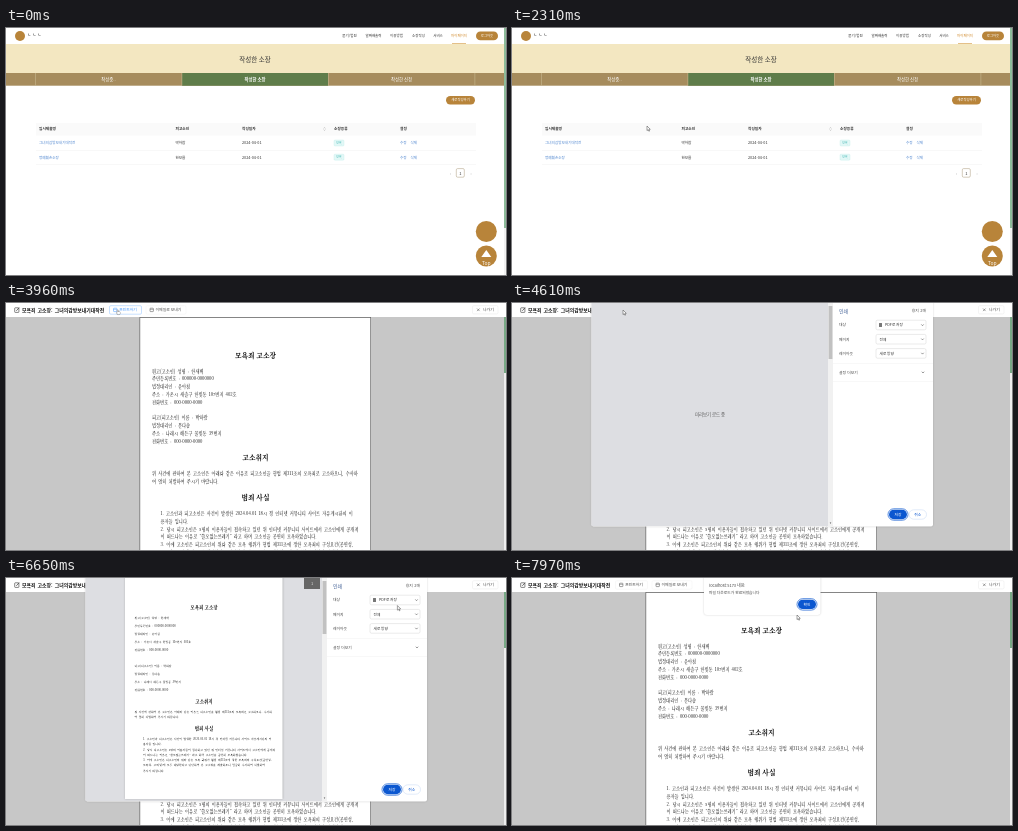
An HTML page with a canvas for the animation above (8000 ms loop, 500 by 247 pixels).

```html
<!DOCTYPE html>
<html lang="ko">
<head>
<meta charset="utf-8">
<style>
html, body { margin: 0; width: 100%; height: 100%; overflow: hidden; background: #fff; }
canvas { display: block; width: 500px; height: 247px; }
</style>
</head>
<body>
<canvas id="stage"></canvas>
<script>
const W = 500, H = 247, LOOP = 8000;
const canvas = document.getElementById('stage');
const ctx = canvas.getContext('2d');
const ratio = Math.max(1, window.devicePixelRatio || 1);
canvas.width = W * ratio;
canvas.height = H * ratio;

const SANS = '"Noto Sans CJK KR", "Noto Sans CJK", "Noto Sans", sans-serif';
const SERIF = '"Noto Serif CJK KR", "Noto Serif", "Noto Sans CJK KR", serif';
const BROWN = '#b8843a', BLUE = '#0b57d0', LINK = '#4f86cf', GREY = '#c7c7c7';

function rect(x, y, w, h, fill) {
  ctx.fillStyle = fill;
  ctx.fillRect(x, y, w, h);
}

function box(x, y, w, h, r, fill, stroke, width = 0.5) {
  ctx.beginPath();
  ctx.roundRect(x, y, w, h, r);
  if (fill) { ctx.fillStyle = fill; ctx.fill(); }
  if (stroke) { ctx.strokeStyle = stroke; ctx.lineWidth = width; ctx.stroke(); }
}

function shadowBox(x, y, w, h, r, fill, blur) {
  ctx.save();
  ctx.shadowColor = 'rgba(0,0,0,.2)';
  ctx.shadowBlur = blur * ratio;
  box(x, y, w, h, r, fill);
  ctx.restore();
}

function circle(x, y, r, fill) {
  ctx.beginPath();
  ctx.arc(x, y, r, 0, 7);
  ctx.fillStyle = fill;
  ctx.fill();
}

function line(points, color, width = 0.5) {
  ctx.beginPath();
  points.forEach(([x, y]) => ctx.lineTo(x, y));
  ctx.strokeStyle = color;
  ctx.lineWidth = width;
  ctx.stroke();
}

function text(s, x, y, size, { color = '#333', weight = 400, align = 'left', font = SANS, gap = 0 } = {}) {
  ctx.font = `${weight} ${size}px ${font}`;
  ctx.textAlign = align;
  ctx.textBaseline = 'middle';
  ctx.wordSpacing = gap + 'px';
  ctx.fillStyle = color;
  ctx.fillText(s, x, y);
}

const centered = (s, x, y, size, color, weight = 400) =>
  text(s, x, y, size, { color, weight, align: 'center' });

// Pointer path: time, x, y
const path = [
  [2050, 250, 125], [2310, 135, 98], [2650, 58, 115], [3090, 58, 115], [3830, 111, 7],
  [4750, 111, 7], [5240, 391, 23], [6590, 391, 23], [7250, 407, 212], [7480, 407, 212],
  [7900, 285, 37], [8000, 285, 37]
];

function pointerAt(t) {
  if (t < path[0][0]) return null;
  const i = Math.max(1, path.findIndex(p => p[0] >= t));
  const [t0, x0, y0] = path[i - 1], [t1, x1, y1] = path[i];
  const k = (t - t0) / (t1 - t0), e = k * k * (3 - 2 * k);
  return { x: x0 + (x1 - x0) * e, y: y0 + (y1 - y0) * e };
}

const over = (p, x, y, w, h) => p && p.x >= x && p.x <= x + w && p.y >= y && p.y <= y + h;

function drawArrow({ x, y }) {
  ctx.beginPath();
  [[0, 0], [0, 4.6], [1.1, 3.7], [1.9, 5.3], [2.6, 5], [1.9, 3.4], [3.3, 3.3]]
    .forEach(([dx, dy]) => ctx.lineTo(x + dx, y + dy));
  ctx.closePath();
  ctx.fillStyle = '#fff';
  ctx.fill();
  ctx.strokeStyle = '#444';
  ctx.lineWidth = 0.5;
  ctx.stroke();
}

function drawHand({ x, y }) {
  box(x - 0.2, y + 1.6, 3.4, 3, 1, '#fff', '#555', 0.4);
  box(x + 0.2, y - 0.2, 1.1, 3.4, 0.5, '#fff', '#555', 0.4);
  rect(x + 0.3, y + 2, 2.4, 1.6, '#fff');
}

function drawList(p) {
  rect(0, 0, W, H, '#fff');
  circle(14, 8, 5, BROWN);
  text('ㄴ ㄴ ㄴ', 21.5, 7, 3.8, { color: '#444', weight: 700, gap: 0.8 });
  [['묻기/법원', 343.5], ['알짜배출력', 367.5], ['이용방법', 390.5], ['소장작성', 412.5], ['서비스', 432], ['마이페이지', 453]]
    .forEach(([s, x], i) => centered(s, x, 8, 3.5, i === 5 ? '#d08a2c' : '#333'));
  rect(446, 15.3, 14, 0.7, '#d9a556');
  box(470, 3.6, 22, 8.6, 4.3, BROWN);
  centered('로그아웃', 481, 8, 3.4, '#fff');

  rect(0, 16, 498, 29, '#f3e7c1');
  centered('작성한 소장', 249, 32, 6.5, '#333', 500);
  rect(0, 45, 498, 12.7, '#a68c5d');
  rect(176, 45, 146, 12.7, '#5f7d4a');
  [29, 175.6, 322, 468.6].forEach(x => rect(x, 45, 0.6, 12.7, '#c9b78f'));
  ['작성중..', '작성한 소장', '작성한 신청']
    .forEach((s, i) => centered(s, 102.5 + 146.5 * i, 51.4, 4.4, '#fff', i === 1 ? 700 : 400));

  box(440, 68, 29, 8.5, 4.2, BROWN);
  centered('새로작성하기', 454.5, 72.2, 3.4, '#fff');

  rect(30, 95, 440, 12.5, '#fafafa');
  [['임시제출명', 33], ['피고소인', 169.5], ['작성일자', 236], ['소장종류', 328], ['설정', 394]]
    .forEach(([s, x]) => text(s, x, 101, 3.7, { weight: 700 }));
  [[-0.5, -1.6], [0.5, 1.6]].forEach(([a, b]) => line([[317.6, 101 + a], [318.5, 101 + b], [319.4, 101 + a]], '#aaa', 0.5));
  [['그녀의감방보내기대작전', '박하람'], ['명예훼손소장', '한보름']].forEach(([name, person], i) => {
    const y = 115 + 14.2 * i;
    if (over(p, 30, y - 7, 440, 14)) rect(30, y - 7, 440, 14, '#fafafa');
    text(name, 33, y, 3.6, { color: LINK });
    text(person, 169.5, y, 3.6);
    text('2024-04-01', 236, y, 3.8);
    box(328, y - 3, 10, 6, 1, '#e3f8f7', '#b5e8e5', 0.3);
    centered('모욕', 333, y, 2.9, '#3bb3b0');
    text('수정', 394, y, 3.6, { color: LINK });
    text('삭제', 404.5, y, 3.6, { color: LINK });
    rect(30, y + 7.1, 440, 0.4, '#ececec');
  });
  centered('‹', 444.5, 144.6, 5, '#bbb');
  box(450.3, 140.6, 8, 8.6, 1.3, '#fff', '#a89878');
  centered('1', 454.3, 145, 4, '#333', 500);
  centered('›', 465, 144.6, 5, '#bbb');

  circle(480.3, 203.5, 10.5, BROWN);
  circle(480.3, 228, 10.5, BROWN);
  ctx.beginPath();
  [[480.3, 222], [485.3, 229], [475.3, 229]].forEach(q => ctx.lineTo(...q));
  ctx.fillStyle = '#fff';
  ctx.fill();
  centered('Top', 480.3, 234.6, 5, '#fff');
  rect(498, 0, 2, H, '#f1f1f1');
  rect(498, 0, 2, 200, '#8dbb9a');
}

const party = (role, name, id, agent, address) => [
  `${role} : ${name}`, ...id, `법정대리인 : ${agent}`, `주소 : ${address}`, '전화번호 : 000-0000-0000'
];
const plaintiff = party('원고(고소인) 성명', '한새벽', ['주민등록번호 : 000000-0000000'], '윤아침', '가온시 새솔구 한빛동 107번지 402호');
const defendant = party('피고(피고소인) 이름', '박하람', [], '문다솜', '나래시 해든구 물빛동 39번지');
const claim = [
  '위 사건에 관하여 본 고소인은 아래와 같은 이유로 피고소인을 형법 제311조의 모욕죄로 고소하오니, 수사하',
  '여 엄히 처벌하여 주시기 바랍니다.'
];
const facts = [
  '1. 고소인과 피고소인은 사건이 발생한 2024.04.01 18시 경 인터넷 커뮤니티 사이트 자유게시판의 이',
  '용자들 입니다.',
  '2. 당시 피고소인은 5명의 이용자들이 접속하고 있던 위 인터넷 커뮤니티 사이트에서 고소인에게 공개적',
  '이 떠드나는 이유로 “쓸모없는쓰레기” 라고 하며 고소인을 공연히 모욕하였습니다.',
  '3. 이에 고소인은 피고소인의 위와 같은 모욕 행위가 형법 제311조에 정한 모욕죄의 구성요건(공연성,',
  '모욕성, 고의성)에 모두 해당한다고 판단하여 본 고소장을 제출하오니 엄중히 수사하여 처벌하여',
  '주시기 바랍니다.'
];

function drawDocument({ x, cx, scale, heads, starts, step, wrap, indent }) {
  const head = (s, y) => text(s, cx, y, 6.8 * scale, { color: '#000', weight: 700, align: 'center', font: SERIF });
  const lines = (list, left, y, dy) => list.forEach((s, i) =>
    text(s, left, y + i * dy, 4.2 * scale, { color: '#000', weight: 500, font: SERIF, gap: 1.1 * scale }));
  ['모욕죄 고소장', '고소취지', '범죄 사실'].forEach((s, i) => head(s, heads[i]));
  lines(plaintiff, x, starts[0], step);
  lines(defendant, x, starts[1], step);
  lines(claim, x, starts[2], wrap);
  lines(facts, x + indent, starts[3], wrap);
}

const screenPage = { x: 146, cx: 249.5, scale: 1, heads: [52, 154.5, 194.5], starts: [68, 114.6, 170.5, 210.5], step: 7.8, wrap: 7.75, indent: 8.5 };
const printPage = { x: 128.5, cx: 198, scale: 0.667, heads: [29, 123.3, 150.3], starts: [40, 88, 134, 161], step: 8, wrap: 5.25, indent: 8.5 };

function toolButton(x, w, label, hot) {
  const color = hot ? '#4096ff' : '#444';
  box(x, 2.7, w, 8.5, 1.3, '#fff', hot ? '#8fc0ff' : '#f0f0f0');
  box(x + 4, 5.2, 3.4, 3.4, 0.5, null, color);
  line([[x + 4, 6.4], [x + 7.4, 6.4]], color, 0.4);
  text(label, x + 9.5, 7, 3.9, { color });
}

function drawEditor(loaded, p) {
  rect(0, 0, W, H, GREY);
  if (loaded) {
    rect(133.5, 14, 231.5, 233, '#666');
    rect(134.2, 14.8, 230.1, 233, '#fff');
    drawDocument(screenPage);
    rect(498, 14, 2, 233, '#eee');
    rect(498, 14, 2, 56, '#78a986');
  } else {
    rect(134, 14, 232, 1.6, '#777');
  }
  rect(0, 0, W, 14, '#fff');
  box(8.7, 4.8, 4.2, 4.6, 0.6, null, '#333', 0.6);
  line([[10.3, 7.8], [13.2, 4.6]], '#333', 0.7);
  text('모욕죄 고소장:' + (loaded ? ' 그녀의감방보내기대작전' : ''), 16, 7, 4.9, { color: '#111', weight: 700, gap: 1 });
  const x = loaded ? 103.5 : 53.5;
  toolButton(x, 32, '프린트하기', over(p, x, 2, 32, 9));
  toolButton(x + 36.5, 40, '이메일로 보내기', false);
  box(466.5, 2.7, 25.5, 8.2, 1.3, '#fff', '#e8e8e8');
  line([[471, 5.5], [473.6, 8.1]], '#444');
  line([[473.6, 5.5], [471, 8.1]], '#444');
  text('나가기', 477, 6.8, 3.9, { color: '#444' });
}

const chevron = (x, y) => line([[x - 1.2, y - 0.6], [x, y + 0.7], [x + 1.2, y - 0.6]], '#555', 0.6);

function primary(x, y, label) {
  box(x - 1, y - 1, 20, 11.4, 5.7, '#fff', BLUE, 0.7);
  box(x, y, 18, 9.4, 4.7, BLUE);
  centered(label, x + 9, y + 4.7, 3.8, '#fff');
}

function drawPrintDialog(stage, p) {
  shadowBox(79.5, -6, 341.5, 229.5, 2, '#fff', 2);
  if (stage === 'blank') return;
  rect(79.5, 0, 237, 223, '#dddee2');
  if (stage === 'ready') {
    shadowBox(119, -4, 157.5, 225, 0, '#fff', 2);
    drawDocument(printPage);
    rect(298, 0, 16, 11, '#666');
    centered('1', 306, 5, 4, '#ddd');
  } else {
    centered('미리보기 로드 중', 198, 111, 4.4, '#555');
  }
  rect(316, 0, 5, 223, '#f1f1f1');
  rect(316.6, 3, 3.8, 53, '#c1c1c1');
  centered('▾', 318.5, 219.5, 3, '#555');
  text('인쇄', 327, 8, 4.9, { color: '#3b5b92' });
  text('용지 2매', 414, 8, 3.9, { color: '#555', align: 'right', gap: 0.6 });
  [['대상', 'PDF로 저장'], ['페이지', '전체'], ['레이아웃', '세로 방향']].forEach(([label, value], i) => {
    const y = 22 + 14.2 * i, hot = !i && over(p, 364, 17, 50, 10);
    text(label, 327, y, 3.8, { color: '#444' });
    box(364, y - 4.8, 50, 9.6, 1.5, hot ? '#e9eaec' : '#fff', '#d5d5d5');
    if (!i) box(367, y - 2.1, 3, 4.2, 0.4, '#777');
    text(value, i ? 367.5 : 373, y, 3.7);
    chevron(410.5, y);
  });
  rect(321, 60, 100, 0.4, '#eee');
  text('설정 더보기', 327, 69.3, 3.8, { color: '#444', gap: 0.5 });
  chevron(411, 69.3);
  rect(321, 78.5, 100, 0.4, '#eee');
  primary(377, 206.8, '저장');
  box(397, 206.8, 17.5, 9.4, 4.7, over(p, 397, 206, 18, 10) ? '#eef3fc' : '#fff', '#c5d6f2');
  centered('취소', 405.7, 211.5, 3.8, BLUE);
}

function drawAlert() {
  shadowBox(192, -6, 116.5, 43, 3, '#fff', 2);
  text('localhost:5173 내용:', 197, 7.2, 4, { color: '#444' });
  text('파일 다운로드가 완료되었습니다', 197, 15, 3.8, { color: '#444' });
  primary(286, 21.7, '확인');
}

function draw(t) {
  ctx.setTransform(ratio, 0, 0, ratio, 0, 0);
  const p = pointerAt(t);
  const dialog = t >= 4330 && t < 7490;
  if (t < 2880) drawList(p);
  else drawEditor(t >= 3090, dialog || t > 7490 ? null : p);
  if (dialog) drawPrintDialog(t >= 7410 ? 'blank' : t >= 4800 ? 'ready' : 'loading', p);
  if (t >= 7570) drawAlert();
  if (!p) return;
  const hand = over(p, 33, 112, 37, 6) || (t >= 2880 && t < 3090) ||
    (t > 3700 && t < 4330) || (dialog && over(p, 364, 17, 50, 10));
  (hand ? drawHand : drawArrow)(p);
}

function tick() {
  draw(performance.now() % LOOP);
  requestAnimationFrame(tick);
}
tick();
</script>
</body>
</html>
```
